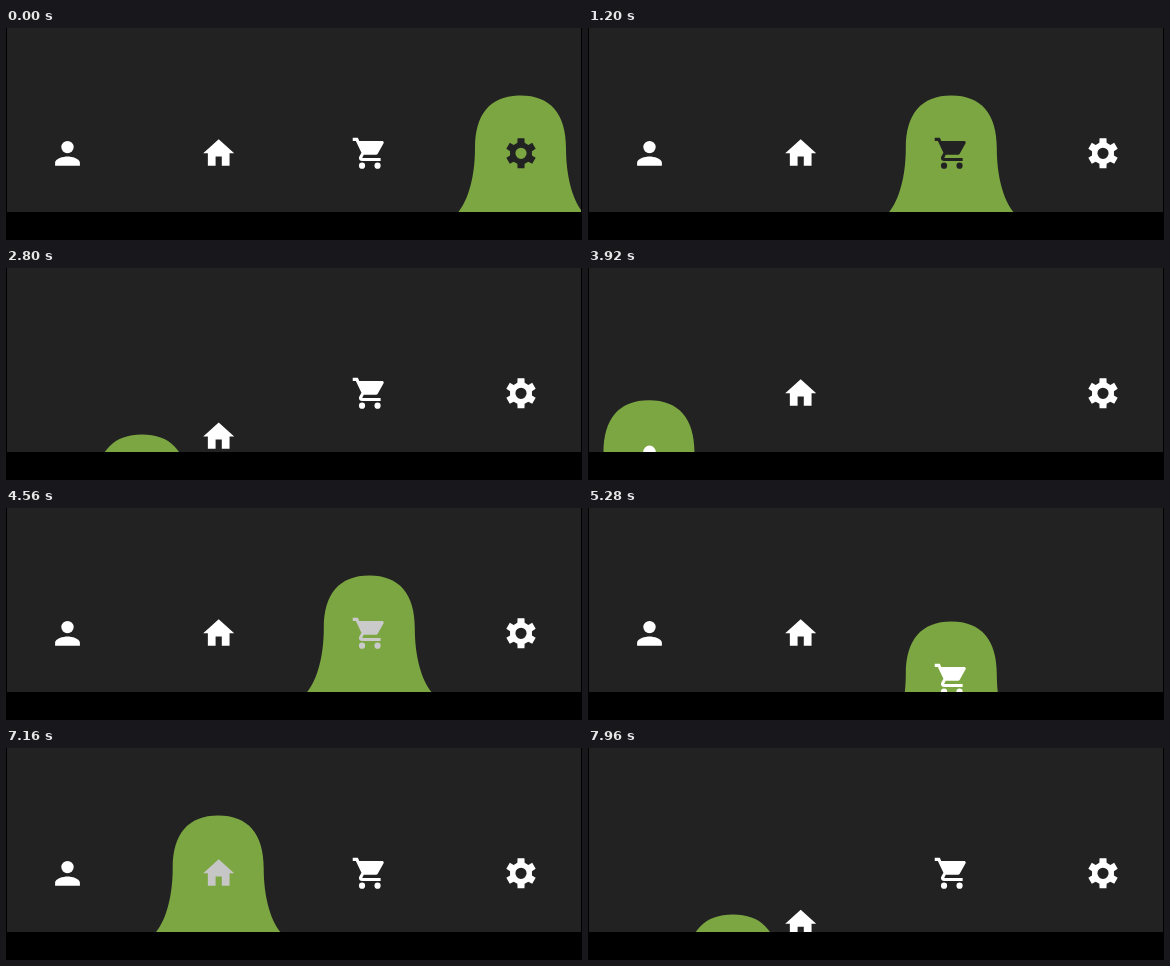
These frames come from a looping animation (576x212 px, 8000 ms). An HTML page:

```html
<!DOCTYPE html>
<html lang="en">
<head>
<meta charset="utf-8">
<title>Tab bar</title>
<style>
  html, body { margin: 0; width: 100%; height: 100%; overflow: hidden; background: #000; }
  svg { display: block; width: 576px; height: 212px; }
</style>
</head>
<body>
<svg viewBox="0 0 576 212">
  <rect x="1" width="574" height="184" fill="#222"/>
  <path id="blob" fill="#7ca642" d="M0 67.5C30 67.5 45.5 86 45.5 120C45.5 148 52 172 62.5 184.5V300H-62.5V184.5C-52 172 -45.5 148 -45.5 120C-45.5 86 -30 67.5 0 67.5Z"/>
  <g id="icons" fill-rule="evenodd"></g>
  <path d="M0 184H576V212H0ZM0 0H1V184H0ZM575 0H576V184H575Z"/>
</svg>
<script>
const LOOP = 8000;
const DEPTH = 99;      // how far the blob sinks
const SINK = 330;      // duration of the sink, and of the rise
const TOTAL = 800;     // one whole change of tab
const [PERSON, HOME, CART, GEAR] = [0, 1, 2, 3];
const centers = [61.5, 212.7, 363.8, 515];

const taps = [
  { at: 60, to: CART },
  { at: 1260, to: HOME },
  { at: 2400, to: PERSON },
  { at: 3737, to: CART },
  { at: 5120, to: GEAR },
  { at: 6335, to: HOME },
  { at: 7575, to: PERSON }
];

function gearPath() {
  const outline = [];
  for (let tooth = 0; tooth < 6; tooth++) {
    for (const [r, deg] of [[7.2, -19], [9.9, -13], [9.9, 13], [7.2, 19]]) {
      const a = (tooth * 60 + deg) * Math.PI / 180;
      outline.push(`${(12 + r * Math.sin(a)).toFixed(2)} ${(12 - r * Math.cos(a)).toFixed(2)}`);
    }
  }
  return `M${outline.join('L')}ZM8.4 12a3.6 3.6 0 1 0 7.2 0a3.6 3.6 0 1 0 -7.2 0Z`;
}

const shapes = [
  'M12 12a4 4 0 1 0 0-8a4 4 0 1 0 0 8zM12 14c-2.67 0-8 1.34-8 4v2h16v-2c0-2.66-5.33-4-8-4z',
  'M10 20v-6h4v6h5v-8h3L12 3 2 12h3v8z',
  'M7 18a2 2 0 1 0 0 4a2 2 0 1 0 0-4zM1 2v2h2l3.6 7.59-1.35 2.45c-.16.28-.25.61-.25.96 0 1.1.9 2 2 2h12v-2H7.42c-.14 0-.25-.11-.25-.25l.03-.12.9-1.63h7.45c.75 0 1.41-.41 1.75-1.03l3.58-6.49c.08-.14.12-.31.12-.48 0-.55-.45-1-1-1H5.21l-.94-2zM17 18a2 2 0 1 0 0 4a2 2 0 1 0 0-4z',
  gearPath()
];

const blob = document.getElementById('blob');
const icons = shapes.map(d => {
  const path = document.createElementNS('http://www.w3.org/2000/svg', 'path');
  path.setAttribute('d', d);
  return document.getElementById('icons').appendChild(path);
});

const span = (u, from, to) => Math.min(1, Math.max(0, (u - from) / (to - from)));
const cubic = p => p < 0.5 ? 4 * p ** 3 : 1 - 4 * (1 - p) ** 3;
const sine = p => (1 - Math.cos(Math.PI * p)) / 2;
const mix = (a, b, p) => a + (b - a) * p;

function draw(time) {
  let from = GEAR, to = GEAR, u = TOTAL * 2;
  for (const tap of taps) {
    if (time < tap.at) break;
    from = to;
    to = tap.to;
    u = time - tap.at;
  }

  const drop = DEPTH * (cubic(span(u, 0, SINK)) - cubic(span(u, TOTAL - SINK, TOTAL)));
  const x = mix(centers[from], centers[to], sine(span(u, 200, 600))) - 0.5;
  blob.setAttribute('transform', `translate(${x} ${drop})`);

  icons.forEach((icon, i) => {
    let dy = 0, shade = 0;
    if (i === to) {
      dy = u < TOTAL / 2 ? DEPTH * span(u, 0, 90) : drop;
      shade = span(u, TOTAL, TOTAL + 100);
    } else if (i === from) {
      dy = u < 245 ? drop : 92 * (1 - sine(span(u, 245, 545)));
      shade = 1 - span(u, 0, 60);
    }
    const level = Math.round(mix(255, 34, shade));
    icon.setAttribute('fill', `rgb(${level},${level},${level})`);
    icon.setAttribute('transform', `translate(${centers[i]} ${125.3 + dy}) scale(1.55) translate(-12 -12)`);
  });
}

const start = performance.now();
function tick() {
  draw((performance.now() - start) % LOOP);
  requestAnimationFrame(tick);
}
tick();
</script>
</body>
</html>
```
